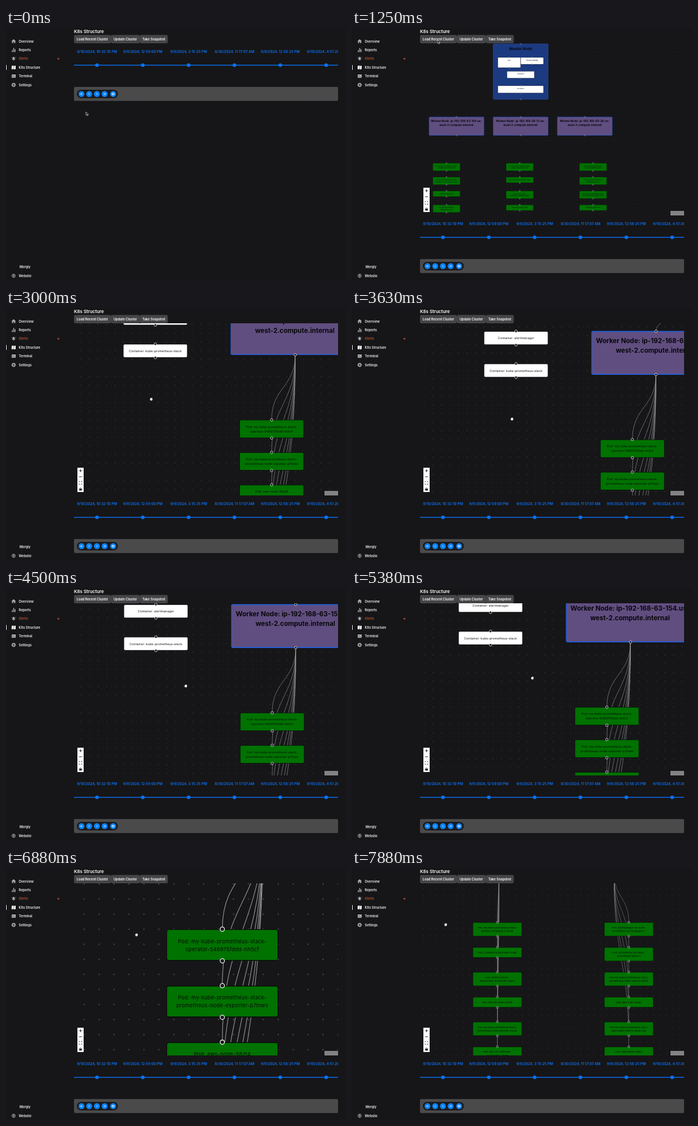
An HTML page for the animation above (8000 ms loop, 600 by 445 pixels).

```html
<!DOCTYPE html>
<html lang="en">
<head>
<meta charset="utf-8">
<title>K8s Structure</title>
<style>
  html, body { margin: 0; width: 100%; height: 100%; overflow: hidden; background: #161618; }
  svg { display: block; width: 600px; height: 445px; font-family: Inter, "Liberation Sans", sans-serif; }
</style>
</head>
<body>
<svg id="stage" viewBox="0 0 600 445">
  <defs>
    <clipPath id="paneClip"><rect x="120" y="27" width="466" height="304"/></clipPath>
    <clipPath id="lineClip"><rect x="120" y="30" width="466" height="50"/></clipPath>
    <pattern id="dots" width="20" height="20" patternUnits="userSpaceOnUse">
      <circle cx="10" cy="10" r=".7" fill="#6a6a6e"/>
    </pattern>
  </defs>
  <rect width="600" height="445" fill="#161618"/>
  <g id="side"></g>
  <g id="pane" clip-path="url(#paneClip)">
    <g id="world">
      <rect x="-1500" y="-1000" width="4000" height="3000" fill="url(#dots)"/>
      <g id="back"></g>
      <g id="edges" fill="none" stroke="#929296" stroke-width=".9"></g>
      <g id="nodes"></g>
    </g>
    <g id="controls"></g>
    <rect x="562" y="323" width="24" height="8" fill="#838385"/>
  </g>
  <g id="history"></g>
  <g id="head"></g>
  <g id="cursor">
    <path id="arrow" d="M0 0V6.2L1.5 4.9 2.5 7 3.5 6.5 2.6 4.5H4.5Z" fill="#111" stroke="#fff" stroke-width=".6"/>
    <path id="hand" d="M-2.2-.2Q-2-1.4-1-1.2L-.8-2.2H1.5L2.5-1.2V.9L1.5 2.6H-1Z" fill="#fff" stroke="#555" stroke-width=".5"/>
  </g>
</svg>
<script>
const NS = "http://www.w3.org/2000/svg";
const $ = id => document.getElementById(id);

function add(parent, tag, attrs, text) {
  const el = document.createElementNS(NS, tag);
  for (const k in attrs) el.setAttribute(k, attrs[k]);
  if (text) el.textContent = text;
  parent.appendChild(el);
  return el;
}
const rect = (g, x, y, width, height, fill, more) => add(g, "rect", { x, y, width, height, fill, ...more });
// y is the vertical middle of the line
const label = (g, s, x, y, size, fill, more) =>
  add(g, "text", { x, y: y + size * .36, "font-size": size, fill, ...more }, s);
const mid = { "text-anchor": "middle" };
const line = (g, d, stroke, width, more) =>
  add(g, "path", { d, stroke, "stroke-width": width, fill: "none", ...more });

// ---- sidebar
const side = $("side");
const menu = ["Overview", "Reports", "Alerts", "K8s Structure", "Terminal", "Settings"];
const item = (s, x, y, fill = "#f2f2f2") => label(side, s, x, y, 5.7, fill, { "font-weight": 600 });
menu.forEach((s, i) => item(s, 22.5, 23.5 + i * 15.4, s == "Alerts" ? "#b4512f" : undefined));
item("Mergly", 24, 421.5);
item("Website", 22.5, 437.5);
rect(side, 0, 65.5, 1, 8.5, "#fff");

const grey = "#a9a9ab";
const solid = (d, fill = grey) => add(side, "path", { d, fill });
solid("M13.5 19.8 17.4 23.2H16.4V26.8H14.4V24.4H12.6V26.8H10.6V23.2H9.6Z");
solid("M10.3 39.5h1.6v3h-1.6zM12.7 35.5h1.6v7h-1.6zM15.1 37.6h1.6v4.9h-1.6z");
solid("M10.8 56.2 11.5 55V53Q11.8 51 13.5 51T15.5 53V55L16.2 56.2ZM12.7 56.8h1.6l-.8 .9z");
line(side, "M10.2 53.5V51.4M16.8 53.5V51.4", grey, .6);
solid("M10 67 12.2 66.2V72.4L10 73.2ZM12.6 66.2 14.5 67V73.2L12.6 72.4ZM14.9 67 17 66.2V72.4L14.9 73.2Z", "#fff");
rect(side, 10, 82, 7.2, 6, grey, { rx: .8 });
line(side, "M11.2 83.6 12.6 85 11.2 86.4M13.3 86.6H15.6", "#222", .6);

function gear(g, x, y, r, fill) {
  add(g, "circle", { cx: x, cy: y, r: r * .58, fill: "none", stroke: fill, "stroke-width": r * .45 });
  add(g, "circle", { cx: x, cy: y, r: r * .88, fill: "none", stroke: fill, "stroke-width": r * .3, "stroke-dasharray": r * .3455 });
}
gear(side, 13.5, 100.5, 3.8, grey);
add(side, "circle", { cx: 13.5, cy: 437.5, r: 3.2, fill: "none", stroke: grey, "stroke-width": .7 });
line(side, "M10.3 437.5H16.7M13.5 434.3V440.7M13.5 434.3Q10.6 437.5 13.5 440.7Q16.4 437.5 13.5 434.3", grey, .6);
solid("M90.2 54.3 92.3 52.3V53.2H94.2V55.4H92.3V56.3Z", "#a2472c");

// ---- title and buttons
const head = $("head");
label(head, "K8s Structure", 120, 6.2, 7.9, "#fff", { "font-weight": 600 });
[["Load Recent Cluster", 120, 65], ["Update Cluster", 185, 51], ["Take Snapshot", 236, 49.5]].forEach(([s, x, w]) => {
  rect(head, x, 12.3, w, 14.7, "#454548", { rx: 3 });
  label(head, s, x + w / 2, 19.8, 5.7, "#fff", { ...mid, "font-weight": 600 });
});

// ---- snapshot line and player bar
const past = $("history"), blue = "#0a72fa";
const stamps = add(past, "g", { "clip-path": "url(#lineClip)" });
rect(stamps, 120, 64.9, 466, 1.4, blue);
["9/10/2024, 10:32:10 PM", "9/9/2024, 12:59:00 PM", "9/9/2024, 3:15:25 PM",
 "8/30/2024, 11:17:07 AM", "9/9/2024, 12:56:25 PM", "9/10/2024, 4:51:26 PM"].forEach((s, i) => {
  const x = 160.5 + i * 80.9;
  add(stamps, "circle", { cx: x, cy: 65.6, r: 3.2, fill: blue });
  label(stamps, s, x, 42.2, 6.2, blue, { ...mid, "font-weight": 600 });
});
rect(past, 120, 104, 466, 24.7, "#4a4a4b", { rx: 2 });
rect(past, 125, 109, 72.5, 15, "#1b1b1d", { rx: 7.5 });
const play = [133.2, 146.8, 160.4, 174, 189];
play.forEach(cx => add(past, "circle", { cx, cy: 116.5, r: 5.2, fill: "#0a84ff" }));
const chevron = (x, dir) => line(past, `M${x - dir * .7} 114.9l${dir * 1.5} 1.6l${-dir * 1.5} 1.6`, "#fff", .8);
chevron(132.2, -1); chevron(134, -1); chevron(146.6, -1);
chevron(160.5, 1); chevron(173.2, 1); chevron(175, 1);
gear(past, 189, 116.5, 2.6, "#e4f1ff");

// ---- zoom controls
const ctl = $("controls");
rect(ctl, 126, 282, 11, 43, "#fff");
line(ctl, "M126 292.7h11M126 303.4h11M126 314.2h11", "#ddd", .4);
line(ctl, "M129 287.4h5M131.5 284.9v5M129 298h5", "#111", .9);
line(ctl, "M129 307.6v-1.4h1.6M132.4 306.2h1.6v1.4M134 310v1.4h-1.6M130.6 311.4H129V310", "#111", .7);
rect(ctl, 129.2, 319.2, 4.6, 3.1, "#111", { rx: .4 });
line(ctl, "M130.2 319.4V318.3Q131.5 316.4 132.8 318.3V319.4", "#111", .7);

// ---- cluster graph
const back = $("back"), edges = $("edges"), nodes = $("nodes");
const hub = { x: 500, y: -129 };

function handles(g, x, w, y, h) {
  for (const cy of [y, y + h])
    add(g, "circle", { cx: x + w / 2, cy, r: 2.9, fill: "#1a1a22", stroke: "#f4f4f4", "stroke-width": 1 });
}
function box(g, x, y, w, h, fill, stroke, width = 1) {
  rect(g, x + .5, y + .5, w - 1, h - 1, fill, { rx: 3, stroke, "stroke-width": width });
}
function small(lines, x, y, fill, w = 150, h = 21 + 10.5 * lines.length) {
  box(nodes, x, y, w, h, fill, "#0a0a0a");
  lines.forEach((s, i) => label(nodes, s, x + w / 2, y + 16 + i * 10.5, 7, "#0a0a0a", { ...mid, "letter-spacing": .21 }));
  handles(nodes, x, w, y, h);
}
function edge(x1, y1, x2, y2) {
  const m = (y1 + y2) / 2;
  add(edges, "path", { d: `M${x1} ${y1}C${x1} ${m} ${x2} ${m} ${x2} ${y2}` });
}

box(back, 350, -395, 300, 300, "#1c3a80", "#2458c4", 2);
label(back, "Master Node", 500, -368, 20, "#0a0a14", { ...mid, "font-weight": 700 });
handles(back, 350, 300, -395, 300);

small(["etcd"], 375, -322, "#fff", 125, 56);
small(["Controller Manager"], 500, -322, "#fff", 125, 38);
small(["Scheduler"], 425, -247, "#fff", 150, 38);
small(["API Server"], 375, -169, "#fff", 250, 40);
small(["Container: alertmanager"], -251, 0, "#fff");
small(["Container: kube-prometheus-stack"], -251, 75, "#fff");

const stack = "my-kube-prometheus-stack-", exporter = "prometheus-node-exporter-";
const pods = [
  [[stack, "operator-546975fddd-nh5cf"], [stack, exporter + "p7mws"], ["aws-node-58zt4"],
   ["ebs-csi-controller-", "7d4b9c6f58-x2kqp"], ["kube-proxy-t6wzd"], [stack, "kube-state-metrics-5c8f-l9r"],
   ["ebs-csi-node-9vj4m"], ["coredns-787cb67946-b8gtn"]],
  [[stack, "grafana-6f7d85b9c4-w5hxt"], ["coredns-787cb67946-7hvdn"], ["metrics-server-",
   "deployment-7c9d58bf6-zgk8n"], ["ebs-csi-node-q2mfd"], [stack, exporter + "c4v8z"],
   ["ebs-csi-controller-", "7d4b9c6f58-mr5tn"], ["kube-proxy-k8xbs"]],
  [["alertmanager-my-kube-", "prometheus-alertmanager-0"], ["prometheus-my-kube-", "prometheus-stack-0"],
   [stack, exporter + "j6tds"], ["aws-node-r4nqz"], [stack, "kube-state-metrics-8b6d-v2p"], ["kube-proxy-dq9xl"]]
];
["63-154", "28-13", "65-28"].forEach((ip, i) => {
  const x = i * 350, cx = x + 150;
  box(nodes, x, 0, 300, 100, "#614e80", "#1f5fe0", 2);
  [`Worker Node: ip-192-168-${ip}.us-`, "west-2.compute.internal"].forEach((s, row) =>
    label(nodes, s, cx - 1, 22 + row * 22.5, 15.3, "#08080c", { ...mid, "font-weight": 700 }));
  handles(nodes, x, 300, 0, 100);
  edge(hub.x, hub.y, cx, 0);
  pods[i].forEach(([first, ...rest], j) => {
    const px = 20 + i * 400, py = 250 + j * 75;
    edge(cx, 100, px + 75, py);
    small(["Pod: " + first, ...rest], px, py, "#007200");
  });
});

// ---- motion: time, x, y, zoom of the pane and time, x, y of the pointer
// a zoom holds the point under the pointer; a drag moves pane and pointer alike
const FAR = .3233, NEAR = .7575, CLOSE = 1.317, WIDE = .58, STRETCH = 1.01;
const camera = [
  [1500, 136, 157, FAR], [2125, 316, 95, FAR], [2500, 316, 95, FAR], [3000, 396.8, 6.2, NEAR],
  [3625, 422.8, 41, NEAR], [4250, 397.8, 29, NEAR], [4625, 397.8, 29, NEAR], [5375, 377.8, 19, NEAR],
  [5625, 377.8, 19, NEAR], [6125, 389.1, -128.5, CLOSE], [6875, 256.6, -224.5, CLOSE],
  [7250, 241.7, -32.5, WIDE], [7375, 241.7, -32.5, WIDE], [7875, -30.6, -50.5, WIDE]
];
const pointer = [
  [125, 141, 148], [625, 151, 21], [1250, 151, 21], [1500, 412, 103], [2125, 592, 41],
  [2500, 256, 161], [3000, 256, 161], [3625, 282, 196], [4250, 257, 184], [4625, 338, 169], [5375, 318, 159],
  [5625, 362.5, 214], [6125, 362.5, 214], [6875, 230, 118], [7250, 230, 118], [7375, 437, 118], [7875, 165, 100]
];
const LOOP = 8000, STEP = 125, LOAD = 1000, LINKS = 1375;

function at(keys, t) {
  if (t <= keys[0][0]) return keys[0].slice(1);
  const i = keys.findIndex(k => k[0] >= t);
  if (i < 0) return keys[keys.length - 1].slice(1);
  const [t0, x0, y0, z0] = keys[i - 1], [t1, x1, y1, z1] = keys[i];
  let p = (t - t0) / (t1 - t0);
  p *= p * (3 - 2 * p);
  let z = z0;
  if (z0 !== z1) {
    z = z0 * (z1 / z0) ** p;
    p = (z - z0) / (z1 - z0);
  }
  return [x0 + (x1 - x0) * p, y0 + (y1 - y0) * p, z];
}
const show = (id, on) => $(id).setAttribute("visibility", on ? "visible" : "hidden");

function draw(now) {
  const t = Math.min(Math.floor((now % LOOP + 6) / STEP) * STEP, LOOP - STEP);
  const loaded = t >= LOAD;
  $("pane").style.display = loaded ? "" : "none";
  past.setAttribute("transform", `translate(0 ${loaded ? 304 : 0})`);
  const [x, y, z] = at(camera, t);
  $("world").setAttribute("transform", `translate(${x} ${y}) scale(${z} ${z * STRETCH})`);
  show("edges", t >= LINKS);
  const [px, py] = at(pointer, t);
  $("cursor").setAttribute("transform", `translate(${px} ${py})`);
  const grab = t >= 1500 && t < 2125 || t >= 2250;
  show("hand", grab);
  show("arrow", !grab);
}
const start = performance.now();
function tick() {
  draw(performance.now() - start);
  requestAnimationFrame(tick);
}
tick();
</script>
</body>
</html>
```
